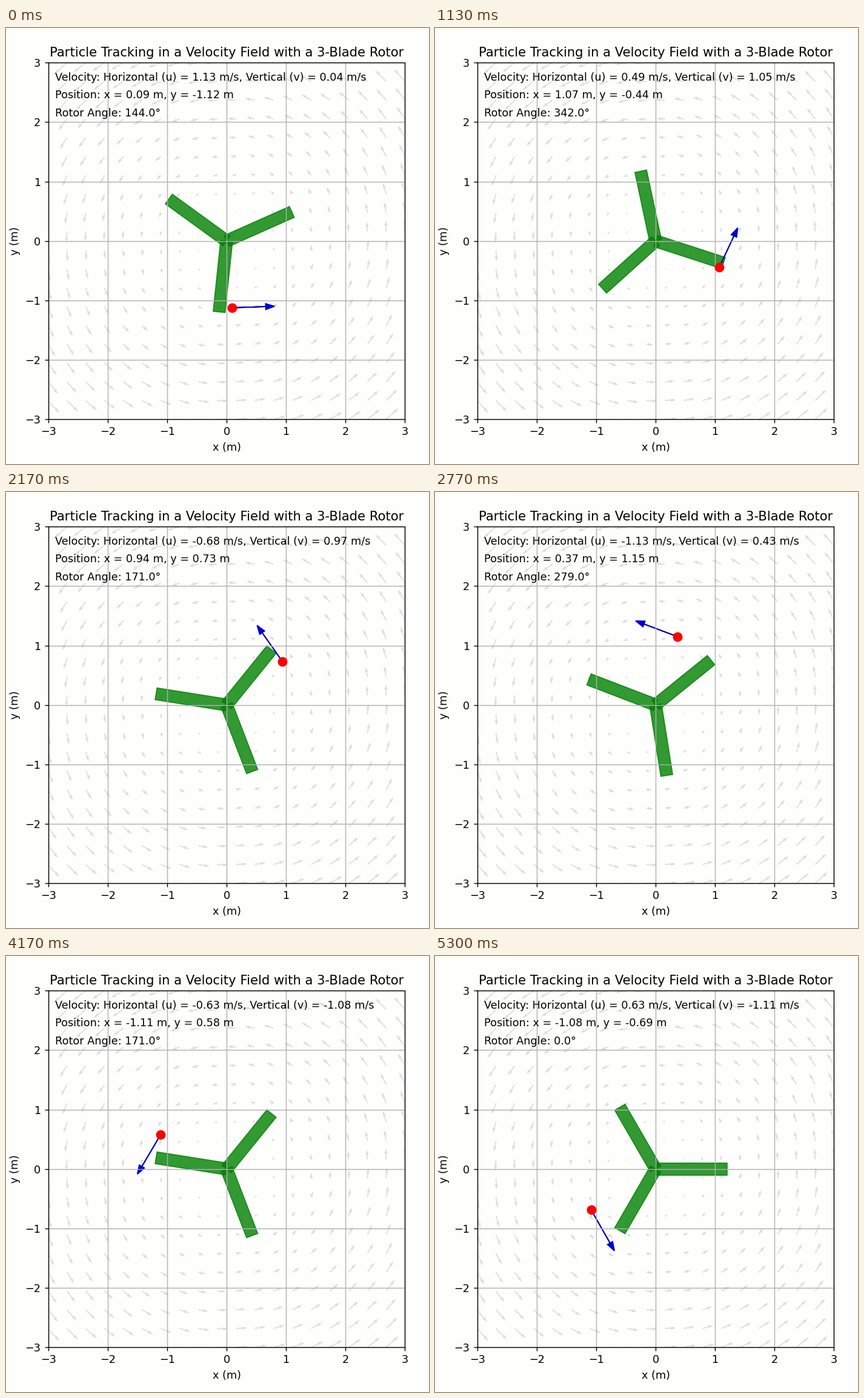
Animation, 698 px wide and 720 px high, one loop 5330 ms. Source, as a matplotlib script:

```python
import numpy as np
import matplotlib.pyplot as plt
from matplotlib.animation import FuncAnimation
from matplotlib.patches import Polygon

W, H, DPI = 698, 720, 127
FRAMES, LOOP_MS = 160, 5330
DT = 0.05                     # simulation time step
FIRST, LAST = 96, 200         # range of simulation steps on show
BLADE_LEN, BLADE_HALF = 1.2, 0.1
PAPER = "#fefefd"
SIDE = 588.8                  # axes size in pixels

plt.rcParams.update({"font.family": "DejaVu Sans", "font.size": 10})

# Euler integration of a particle in solid-body rotation, z = x + iy
path = (1 + 1j * DT) ** np.arange(LAST + 1)

fig = plt.figure(figsize=(W / DPI, H / DPI), dpi=DPI, facecolor=PAPER)
ax = fig.add_axes([69.6 / W, 73.9 / H, SIDE / W, SIDE / H], facecolor=PAPER)
ax.set(xlim=(-3, 3), ylim=(-3, 3), xticks=range(-3, 4), yticks=range(-3, 4),
       xlabel="x (m)", ylabel="y (m)")
ax.set_title("Particle Tracking in a Velocity Field with a 3-Blade Rotor",
             fontsize=12)
ax.grid(color="#b0b0b0", lw=0.8)

X, Y = np.meshgrid(np.linspace(-3, 3, 20), np.linspace(-3, 3, 20))
ax.quiver(X, Y, -Y, X, color="#dedee0")

blades = [ax.add_patch(Polygon(np.zeros((4, 2)), color="green", alpha=0.8))
          for _ in range(3)]
arrow = ax.arrow(0, 0, 1, 0, width=0.001, head_width=0.1, head_length=0.15,
                 fc="#0000e4", ec="#0000b8")
dot, = ax.plot([], [], "o", ms=8, color="red")
lines = [ax.text(0.02, y, "", transform=ax.transAxes) for y in (0.95, 0.90, 0.85)]


def blade_corners(deg):
    a = np.radians(deg)
    along = np.array([np.cos(a), np.sin(a)])
    side = BLADE_HALF * np.array([-along[1], along[0]])
    tip = BLADE_LEN * along
    return np.array([side, tip + side, tip - side, -side])


def update(i):
    # the simulation runs at 20 steps/s, shown at 30 frames/s
    n = min(FIRST + 2 * i // 3, LAST)
    pos, vel = path[n], 1j * path[n - 1]
    angle = 9.0 * n % 360

    for k, blade in enumerate(blades):
        blade.set_xy(blade_corners(angle + 120 * k))
    dot.set_data([pos.real], [pos.imag])
    arrow.set_data(x=pos.real, y=pos.imag, dx=vel.real / 2, dy=vel.imag / 2)

    lines[0].set_text(f"Velocity: Horizontal (u) = {vel.real:.2f} m/s, "
                      f"Vertical (v) = {vel.imag:.2f} m/s")
    lines[1].set_text(f"Position: x = {pos.real:.2f} m, y = {pos.imag:.2f} m")
    lines[2].set_text(f"Rotor Angle: {angle:.1f}°")
    return [*blades, arrow, dot, *lines]


anim = FuncAnimation(fig, update, frames=FRAMES, interval=LOOP_MS / FRAMES,
                     repeat=True, repeat_delay=0, blit=False)
plt.show()
```
